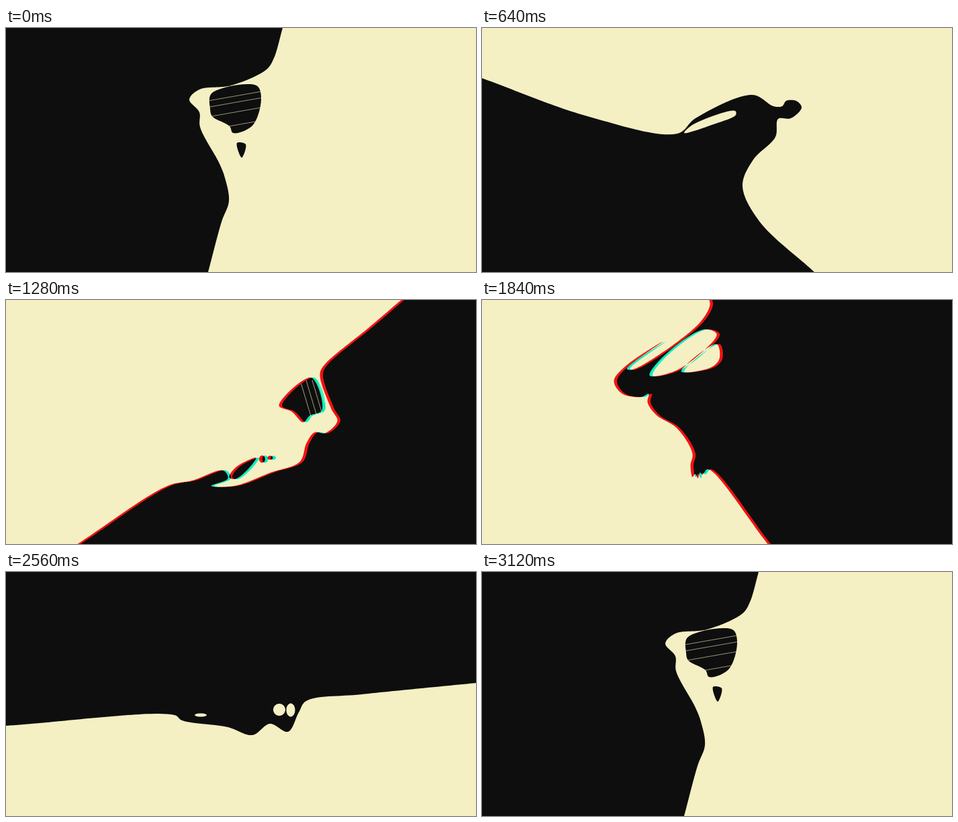
Recreate the animation shown at these times as an HTML page with a canvas. Size 700 by 365 pixels, loop 3200 ms.

```html
<!DOCTYPE html>
<html lang="en">
<head>
<meta charset="utf-8">
<title>Turning silhouette</title>
<style>
  html, body { margin: 0; width: 100%; height: 100%; overflow: hidden; background: #0e0e0e; }
  canvas { display: block; width: 700px; height: 365px; }
</style>
</head>
<body>
<canvas id="stage" width="700" height="365"></canvas>
<script>
const LOOP = 3200, STEP = 80, W = 700, H = 365, CX = 350, CY = 182;
const DARK = '#0e0e0e';
// Added to the dark ground, the two inks give cream together.
const RED = 'rgb(230,4,2)', CYAN = 'rgb(0,222,180)';
const SPLIT = { from: 1200, to: 2080, shift: -4.5 };
const HOLE_LIFE = 300;

const rad = deg => deg * Math.PI / 180;
const lerp = (a, b, u) => a + (b - a) * u;
const mix = (p, q, u) => [lerp(p[0], q[0], u), lerp(p[1], q[1], u)];
const gap = (p, q) => Math.hypot(q[0] - p[0], q[1] - p[1]);

function oval(x, y, rx, ry, tilt = 0) {
  const out = [], c = Math.cos(tilt), s = Math.sin(tilt);
  for (let u = 0; u < 6.2; u += Math.PI / 4) {
    const a = rx * Math.cos(u), b = ry * Math.sin(u);
    out.push(x + a * c - b * s, y + a * s + b * c);
  }
  return out;
}

// Key points of the edge, walked with the dark side on the right: lead-in, figure, lead-out.
const rest = {
  t: 0, angle: 107,
  lead: [412,0],
  body: [399,45, 388,62, 335,86, 288,92, 273,107, 288,126, 289,148, 318,203, 326,224, 332,259, 321,290],
  tail: [301,365],
  holes: [
    [306,98, 373,86, 380,105, 367,146, 338,157, 333,147, 307,132, 304,121],
    [344,172, 357,174, 351,194]],
  streak: i => [300, 109 + 7 * i + 2.5 * i * i, 400, 91.5 + 7 * i + 2.5 * i * i]
};
const poses = [
  rest,
  { t: 640, angle: 30.4,
    lead: [0,75, 157,132],
    body: [291,158, 318,135, 403,100, 434,117, 447,117, 453,109, 468,109, 476,119, 460,135, 441,136,
      437,163, 404,197, 388,236, 413,289],
    tail: [495,365],
    holes: [[301,157, 315,144, 377,124, 378,130, 345,144]] },
  { t: 1280, angle: -37.1,
    lead: [111,365],
    body: [245,278, 282,270, 328,255, 335,267, 310,278, 345,278, 399,258, 442,242, 452,214, 464,198,
      480,199, 498,181, 489,163, 472,112, 477,99],
    tail: [544,42, 593,0],
    holes: [
      [411,158, 459,116, 475,165, 457,173, 447,183, 430,167],
      [337,265, 347,250, 377,236, 362,256, 345,268],
      oval(386, 238, 4.5, 5.5), oval(398, 236, 4, 3)],
    streak: i => [438 + 9 * i, 120, 458 + 9 * i, 187] },
  { t: 1840, angle: -103.4,
    lead: [430,365],
    body: [341,253, 333,261, 329,258, 326,267, 322,260, 318,265, 315,247, 318,230, 295,192, 264,172,
      251,153, 253,140, 242,145, 213,140, 201,121, 217,100, 274,62, 220,103, 229,104, 326,37],
    tail: [344,8, 343,0],
    holes: [
      [254,113, 275,84, 335,44, 354,51, 330,80, 290,107],
      [301,107, 354,66, 358,88, 345,101]] },
  { t: 2160, angle: -139.7,
    lead: [560,365, 490,322],
    body: [440,282, 390,262, 358,277, 335,298, 322,327, 286,340, 286,365, 272,398, 255,368, 265,347,
      243,316, 246,278, 254,243, 280,188],
    tail: [220,106, 190,65, 130,0],
    holes: [oval(275.5, 218, 3.2, 9, 0.15), oval(268, 262.5, 2.3, 10, 0.08)] },
  { t: 2560, angle: -185.2,
    lead: [700,166, 530,183],
    body: [447,193, 436,210, 420,239, 393,227, 367,244, 330,232, 262,222, 251,214],
    tail: [0,230],
    holes: [oval(290, 214, 9, 2.5), oval(407, 206, 9, 9), oval(424, 206.5, 6.5, 10)] },
  { ...rest, t: 3120, angle: rest.angle + 2.3 - 360 }
];

// Flat stage numbers to points in the turned frame of a pose.
function toLocal(flat, angle) {
  const c = Math.cos(rad(angle)), s = Math.sin(rad(angle)), out = [];
  for (let i = 0; i < flat.length; i += 2) {
    const x = flat[i] - CX, y = flat[i + 1] - CY;
    out.push([x * c + y * s, y * c - x * s]);
  }
  return out;
}

// Centripetal spline, a fixed number of samples per span.
const SPAN = 12;
function smooth(pts, closed) {
  const n = pts.length, out = [];
  const at = i => closed ? pts[(i + n) % n]
    : i < 0 ? mix(pts[0], pts[1], -1)
    : i >= n ? mix(pts[n - 1], pts[n - 2], -1) : pts[i];
  for (let i = 0; i < (closed ? n : n - 1); i++) {
    const p = [at(i - 1), at(i), at(i + 1), at(i + 2)], k = [0];
    for (let j = 0; j < 3; j++) k.push(k[j] + Math.sqrt(gap(p[j], p[j + 1])));
    for (let j = 0; j < SPAN; j++) {
      const v = lerp(k[1], k[2], j / SPAN);
      const part = (a, b, from, to) => mix(a, b, (v - k[from]) / (k[to] - k[from]));
      const a = part(p[0], p[1], 0, 1), b = part(p[1], p[2], 1, 2), c = part(p[2], p[3], 2, 3);
      out.push(part(part(a, b, 0, 2), part(b, c, 1, 3), 1, 2));
    }
  }
  if (!closed) out.push(pts[n - 1]);
  return out;
}

// Evenly spaced points, so that two curves can be blended one to one.
function resample(pts, count) {
  const run = [0], out = [];
  for (let i = 1; i < pts.length; i++) run.push(run[i - 1] + gap(pts[i - 1], pts[i]));
  const total = run[run.length - 1];
  for (let i = 0, j = 0; i <= count; i++) {
    const d = total * i / count;
    while (j < pts.length - 2 && run[j + 1] < d) j++;
    out.push(mix(pts[j], pts[j + 1], (d - run[j]) / (run[j + 1] - run[j] || 1)));
  }
  return out;
}

// A point far off stage, straight on from the end of the edge.
const beyond = (end, before) => mix(end, before, -450 / gap(end, before));

for (const pose of poses) {
  const all = toLocal([...pose.lead, ...pose.body, ...pose.tail], pose.angle);
  const first = pose.lead.length / 2 * SPAN, last = first + (pose.body.length / 2 - 1) * SPAN;
  const curve = smooth(all), n = curve.length;
  pose.edge = [
    ...resample([beyond(curve[0], curve[1]), ...curve.slice(0, first + 1)], 120),
    ...resample(curve.slice(first, last + 1), 320),
    ...resample([...curve.slice(last), beyond(curve[n - 1], curve[n - 2])], 120)
  ];
  pose.gaps = pose.holes.map(h => {
    const pts = smooth(toLocal(h, pose.angle), true);
    const sum = pts.reduce((m, p) => [m[0] + p[0], m[1] + p[1]], [0, 0]);
    return { pts, mid: sum.map(v => v / pts.length) };
  });
  pose.streaks = pose.streak ? [0, 1, 2, 3].map(i => toLocal(pose.streak(i), pose.angle)) : [];
}

const ctx = document.getElementById('stage').getContext('2d');

function addShape(path, pts) {
  pts.forEach(p => path.lineTo(p[0], p[1]));
  path.closePath();
}

function outline(pts) {
  const path = new Path2D();
  addShape(path, pts);
  return path;
}

function place(angle, shift) {
  ctx.setTransform(1, 0, 0, 1, CX + shift, CY);
  ctx.rotate(rad(angle));
}

function drawStreaks(pose, size) {
  const { pts, mid } = pose.gaps[0];
  ctx.save();
  ctx.clip(outline(pts.map(p => mix(mid, p, size))));
  ctx.strokeStyle = 'rgba(244,240,196,.6)';
  ctx.beginPath();
  for (const line of pose.streaks) {
    const [p, q] = line.map(e => mix(mid, e, size));
    ctx.moveTo(p[0], p[1]);
    ctx.lineTo(q[0], q[1]);
  }
  ctx.stroke();
  ctx.restore();
}

function draw(t) {
  let i = poses.length - 1;
  while (poses[i].t > t) i--;
  const a = poses[i], wrap = i === poses.length - 1, b = poses[wrap ? 0 : i + 1];
  const length = (wrap ? LOOP : b.t) - a.t, u = (t - a.t) / length;
  const angle = lerp(a.angle, wrap ? b.angle - 360 : b.angle, u);

  const edge = a.edge.map((p, j) => mix(p, b.edge[j], u));
  const light = outline([...edge, [edge[edge.length - 1][0], -1200], [edge[0][0], -1200]]);

  // Openings close as a pose passes and open as the next one nears.
  const life = Math.min(HOLE_LIFE, length);
  const shown = [[a, t - a.t], [b, length * (1 - u)]]
    .map(([pose, away]) => ({ pose, size: Math.sqrt(Math.max(0, 1 - away / life)) }))
    .filter(s => s.size > 0.01);
  for (const { pose, size } of shown) {
    for (const h of pose.gaps) light.addPath(outline(h.pts.map(p => mix(h.mid, p, size))));
  }

  ctx.setTransform(1, 0, 0, 1, 0, 0);
  ctx.globalCompositeOperation = 'source-over';
  ctx.fillStyle = DARK;
  ctx.fillRect(0, 0, W, H);

  const shift = t >= SPLIT.from && t < SPLIT.to ? SPLIT.shift : 0;
  ctx.globalCompositeOperation = 'lighter';
  for (const [ink, dx] of [[RED, 0], [CYAN, shift]]) {
    place(angle, dx);
    ctx.fillStyle = ink;
    ctx.fill(light, 'evenodd');
  }

  ctx.globalCompositeOperation = 'source-over';
  place(angle, 0);
  for (const { pose, size } of shown) drawStreaks(pose, size);
}

const start = performance.now();
function tick() {
  const now = Math.max(0, performance.now() - start) % LOOP;
  draw(Math.floor(now / STEP) * STEP);
  requestAnimationFrame(tick);
}
tick();
</script>
</body>
</html>
```
